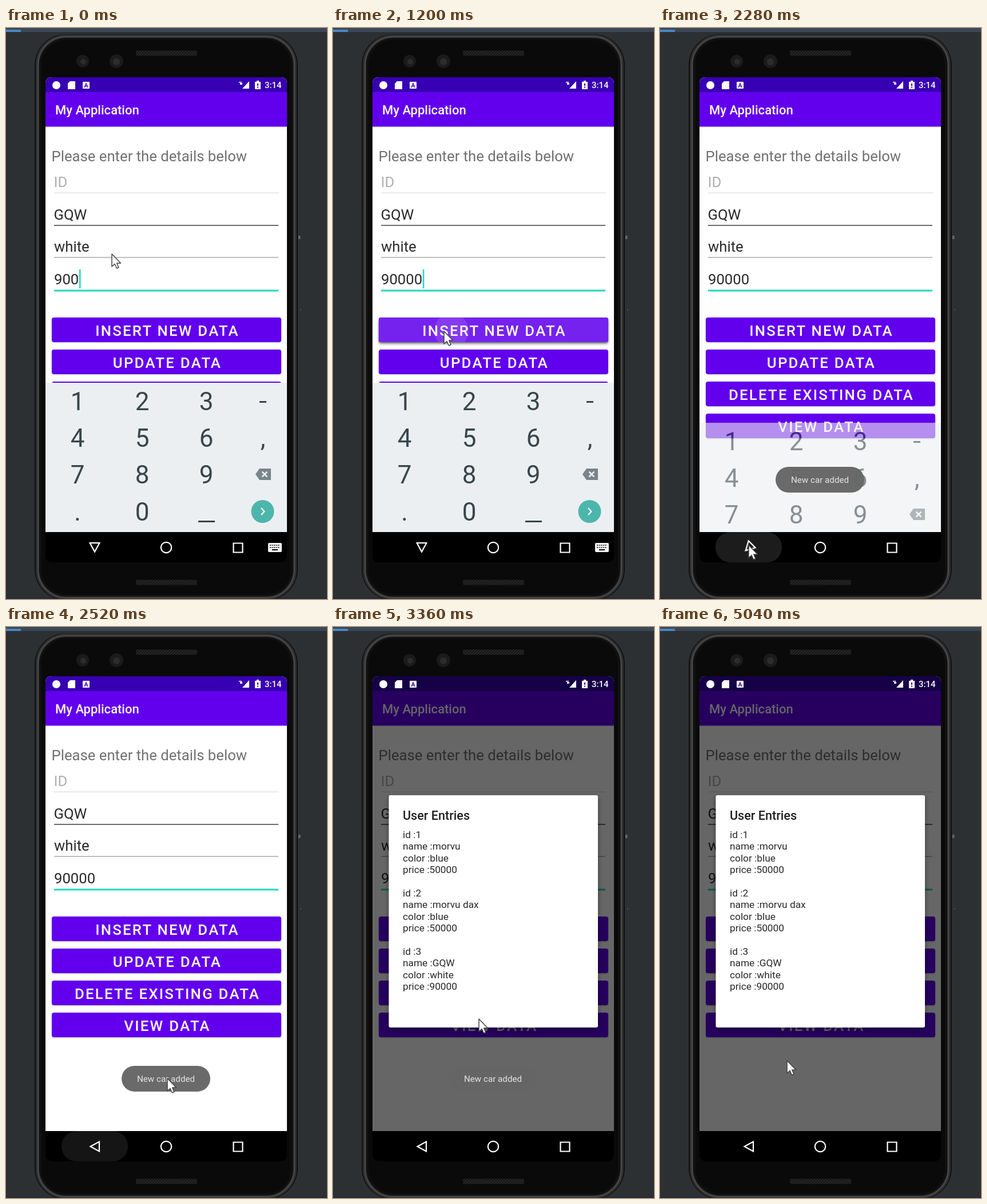
These frames come from a looping animation (561x998 px, 5520 ms). An HTML page:

```html
<!DOCTYPE html>
<html lang="en">
<head>
<meta charset="utf-8">
<title>Car form demo</title>
<style>
html, body { margin: 0; width: 100%; height: 100%; overflow: hidden; background: #2d3032; }
svg { display: block; width: 561px; height: 998px; font-family: Roboto, sans-serif; filter: blur(.75px); }

.form { font-size: 25.7px; fill: #2a2a2a; }
.btn { fill: #6200ee; filter: drop-shadow(0 1.5px 1px #0004); }
.pressed { fill: #7622ef; filter: drop-shadow(0 3px 2px #0007); }
.caps { font-size: 25.7px; font-weight: 500; letter-spacing: 2.29px; fill: #fff; text-anchor: middle; }
.keys { font-size: 44px; fill: #37464d; text-anchor: middle; }
.nav { fill: none; stroke: #fff; stroke-width: 2.2; }
.line { fill: none; stroke-linejoin: round; }

/* One loop is 46 ticks of 120 ms; every change lands on a tick. */
.a { animation: 5520ms step-end infinite; }
#pointer { animation-name: pointer; }
#fourth { animation-name: fourth; }
#fifth { animation-name: fifth; }
#caret { animation-name: caret; }
#tapInsert { animation-name: tapInsert; }
#tapView { animation-name: tapView; }
#waveInsert { animation-name: waveInsert; transform-origin: 207px 529px; }
#waveView { animation-name: waveView; transform-origin: 274px 697px; }
#keyboard { animation-name: keyboard; }
#imeIcon { animation-name: imeIcon; }
#back { animation-name: back; transform-origin: 155px 908px; }
#backWave { animation-name: backWave; }
#toast { animation-name: toast; }
#dim { animation-name: dim; }
#dialog { animation-name: dialog; }

@keyframes pointer {
  0% { transform: translate(185px, 395px); }
  13.04% { transform: translate(185px, 395px); animation-timing-function: steps(3); }
  19.56% { transform: translate(194px, 530px); }
  23.91% { transform: translate(194px, 530px); animation-timing-function: steps(3); }
  30.43% { transform: translate(236px, 900px); animation-timing-function: steps(2); }
  34.78% { transform: translate(155px, 904px); }
  41.3% { transform: translate(155px, 904px); animation-timing-function: steps(2); }
  45.65% { transform: translate(282px, 789px); animation-timing-function: steps(3); }
  52.17% { transform: translate(272px, 704px); }
  58.69% { transform: translate(272px, 704px); animation-timing-function: steps(3); }
  65.21% { transform: translate(221px, 647px); }
  69.56% { transform: translate(221px, 647px); animation-timing-function: steps(2); }
  73.91% { transform: translate(115px, 597px); }
  78.26% { transform: translate(115px, 597px); animation-timing-function: steps(6); }
  91.3%, 100% { transform: translate(222px, 758px); }
}
@keyframes fourth { 0% { fill-opacity: 0; } 6.52%, 100% { fill-opacity: 1; } }
@keyframes fifth { 0% { fill-opacity: 0; } 13.04%, 100% { fill-opacity: 1; } }
@keyframes caret {
  0% { transform: none; opacity: 1; }
  6.52% { transform: translateX(14.4px); opacity: 1; }
  13.04% { transform: translateX(28.8px); opacity: 1; }
  23.91% { transform: translateX(28.8px); opacity: 0; }
  32.6% { transform: translateX(28.8px); opacity: 1; }
  41.3% { transform: translateX(28.8px); opacity: 0; }
  50% { transform: translateX(28.8px); opacity: 1; }
  58.69%, 100% { transform: translateX(28.8px); opacity: 0; }
}
@keyframes tapInsert {
  0% { opacity: 0; } 19.56% { opacity: .5; } 21.73% { opacity: 1; }
  26.08% { opacity: .45; } 28.26%, 100% { opacity: 0; }
}
@keyframes waveInsert {
  0% { transform: scale(.4); } 21.73% { transform: none; }
  23.91% { transform: scale(3); } 26.08%, 100% { transform: scale(7); }
}
@keyframes tapView {
  0% { opacity: 0; } 54.34% { opacity: .5; } 56.52% { opacity: 1; }
  58.69% { opacity: .6; } 60.86%, 100% { opacity: 0; }
}
@keyframes waveView {
  0% { transform: scale(.4); } 56.52% { transform: none; } 58.69%, 100% { transform: scale(4); }
}
@keyframes keyboard {
  0% { transform: none; opacity: 1; }
  41.3% { transform: translateY(70px); opacity: .6; }
  43.47%, 100% { transform: translateY(262px); opacity: 0; }
}
@keyframes imeIcon { 0% { opacity: 1; } 41.3%, 100% { opacity: 0; } }
@keyframes back {
  0% { transform: rotate(-90deg); } 41.3% { transform: rotate(-45deg); } 43.47%, 100% { transform: none; }
}
@keyframes backWave {
  0% { opacity: 0; } 39.13% { opacity: .6; } 41.3% { opacity: 1; }
  45.65% { opacity: .75; } 47.82% { opacity: .35; } 50%, 100% { opacity: 0; }
}
@keyframes toast {
  0% { opacity: 0; } 28.26% { opacity: .35; } 30.43% { opacity: .9; } 32.6% { opacity: 1; }
  65.21% { opacity: .5; } 67.39%, 100% { opacity: 0; }
}
@keyframes dim { 0% { opacity: 0; } 58.69% { opacity: .35; } 60.86%, 100% { opacity: .6; } }
@keyframes dialog {
  0% { opacity: 0; } 56.52% { opacity: .24; } 58.69% { opacity: .75; } 60.86%, 100% { opacity: 1; }
}
</style>
</head>
<body>
<svg viewBox="0 0 561 998">
  <defs>
    <clipPath id="screen"><path d="M69 934V97Q69 86 80 86H480Q491 86 491 97V934Z"/></clipPath>
    <clipPath id="imeArea"><path d="M69 620H491V881H69Z"/></clipPath>
    <clipPath id="insertArea"><rect x="80" y="506" width="401" height="43" rx="4"/></clipPath>
    <clipPath id="viewArea"><rect x="80" y="674" width="401" height="43" rx="4"/></clipPath>
    <pattern id="mesh" width="5" height="5" patternUnits="userSpaceOnUse">
      <path d="M0 0H5V5H0Z" fill="#181818"/><path d="M0 5L5 0" stroke="#383838"/>
    </pattern>
  </defs>

  <!-- backdrop and phone body -->
  <path d="M-5 -5H566V1003H-5Z" fill="#2d3032"/>
  <path d="M-5 -5H566V7H-5Z" fill="#3c4855"/>
  <path d="M-5 3H26V7H-5Z" fill="#4a87c5"/>
  <path d="M-5 996H566V1003H-5Z" fill="#25273a"/>
  <rect x="50" y="11" width="460" height="989" rx="54" fill="#101010"/>
  <rect x="55" y="14.500" width="450" height="982" rx="50" class="line" stroke="#2f2f2f" stroke-width="6"/>
  <rect x="56" y="15" width="448" height="981" rx="49" class="line" stroke="#4a4a4a" stroke-width="2"/>
  <rect x="62" y="21" width="436" height="969" rx="43" fill="#0a0a0a"/>
  <path d="M511 363H514.500V369H511Z" fill="#666"/>
  <path d="M514 491H516V494H514Z" fill="#484848"/>
  <g fill="#1b1b1b"><circle cx="134" cy="58" r="11"/><circle cx="193" cy="58" r="12"/></g>
  <g fill="#2c2c2e"><circle cx="135" cy="59" r="5"/><circle cx="193" cy="59" r="6"/></g>
  <g fill="url(#mesh)">
    <rect x="227" y="39.500" width="107" height="9" rx="3"/>
    <rect x="227" y="964.500" width="107" height="9" rx="3"/>
  </g>

  <g clip-path="url(#screen)">
    <path d="M69 86H491V881H69Z" fill="#fff"/>
    <path d="M69 86H491V112H69Z" fill="#3700b3"/>
    <path d="M69 112H491V172.500H69Z" fill="#6200ee"/>
    <text x="86" y="151" font-size="22" font-weight="500" fill="#fff">My Application</text>

    <!-- form -->
    <text x="79.500" y="233" font-size="25.7" fill="#717171">Please enter the details below</text>
    <g class="form">
      <text x="83.500" y="278" fill="#b0b0b0">ID</text>
      <text x="83.500" y="335">GQW</text>
      <text x="84" y="391">white</text>
      <text x="84" y="448">900<tspan id="fourth" class="a">0</tspan><tspan id="fifth" class="a">0</tspan></text>
    </g>
    <path d="M84 287.500H477V289H84Z" fill="#e2e2e2"/>
    <path d="M84 344H476V346H84Z" fill="#6c6c6c"/>
    <path d="M84 400H476V402H84Z" fill="#bdbdbd"/>
    <path d="M84 457.500H476V460.500H84Z" fill="#1fd8c4"/>
    <path id="caret" class="a" d="M128 422H130.500V455H128Z" fill="#1fd8c4"/>

    <!-- buttons -->
    <rect class="btn" x="80" y="506" width="401" height="43" rx="4"/>
    <rect class="btn" x="80" y="562" width="401" height="43" rx="4"/>
    <rect class="btn" x="80" y="618" width="401" height="43" rx="4"/>
    <rect class="btn" x="80" y="674" width="401" height="43" rx="4"/>
    <g id="tapInsert" class="a">
      <rect class="pressed" x="80" y="506" width="401" height="43" rx="4"/>
      <g clip-path="url(#insertArea)"><circle id="waveInsert" class="a" cx="207" cy="529" r="30" fill="#fff" fill-opacity=".11"/></g>
    </g>
    <g id="tapView" class="a">
      <rect class="pressed" x="80" y="674" width="401" height="43" rx="4"/>
      <g clip-path="url(#viewArea)"><circle id="waveView" class="a" cx="274" cy="697" r="41" fill="#fff" fill-opacity=".11"/></g>
    </g>
    <g class="caps">
      <text x="282" y="537.500">INSERT NEW DATA</text>
      <text x="282" y="593.500">UPDATE DATA</text>
      <text x="282" y="649.500">DELETE EXISTING DATA</text>
      <text x="282" y="705.500">VIEW DATA</text>
    </g>

    <!-- numeric keyboard -->
    <g clip-path="url(#imeArea)">
      <g id="keyboard" class="a">
        <path d="M69 620H491V881H69Z" fill="#eceff1"/>
        <g class="keys">
          <text x="125 238 350" y="668">123</text>
          <text x="125 238 350" y="732">456</text>
          <text x="125 238 350" y="796">789</text>
          <text x="125 238" y="861">.0</text>
          <text x="449" y="732">,</text>
        </g>
        <path d="M336 861H365V864H336ZM443 652H455V655H443Z" fill="#37464d"/>
        <path d="M436 780L443 770H463V790H443Z" fill="#79858b"/>
        <path d="M447.500 775.500L456.500 784.500M456.500 775.500L447.500 784.500" stroke="#eceff1" stroke-width="2.500"/>
        <circle cx="448.500" cy="845" r="20" fill="#4db6ac"/>
        <path class="line" d="M446 839L451.500 845L446 851" stroke="#fff" stroke-width="2.200"/>
      </g>
    </g>

    <!-- dialog -->
    <path id="dim" class="a" d="M69 86H491V881H69Z" opacity="0"/>
    <g id="dialog" class="a">
      <rect x="97.500" y="294" width="365.500" height="406" rx="3" fill="#fff" style="filter: drop-shadow(0 3px 5px #0006)"/>
      <text x="122" y="337" font-size="21.6" font-weight="500" fill="#202020">User Entries</text>
      <text y="369" font-size="17.3" fill="#282828">
        <tspan x="122">id :1</tspan>
        <tspan x="122" dy="20.4">name :morvu</tspan>
        <tspan x="122" dy="20.4">color :blue</tspan>
        <tspan x="122" dy="20.4">price :50000</tspan>
        <tspan x="122" dy="40.8">id :2</tspan>
        <tspan x="122" dy="20.4">name :morvu dax</tspan>
        <tspan x="122" dy="20.4">color :blue</tspan>
        <tspan x="122" dy="20.4">price :50000</tspan>
        <tspan x="122" dy="40.8">id :3</tspan>
        <tspan x="122" dy="20.4">name :GQW</tspan>
        <tspan x="122" dy="20.4">color :white</tspan>
        <tspan x="122" dy="20.4">price :90000</tspan>
      </text>
    </g>

    <!-- status icons -->
    <g fill="#fff">
      <circle cx="88" cy="100" r="7"/>
      <path d="M112 93H121V107H108V97Z"/>
      <rect x="134" y="94" width="12" height="12" rx="1"/>
      <path d="M425 93V106H413ZM407 94H412V95.500H407ZM409 96H413V99H409Z"/>
      <path d="M438 92H442V94H445V107H435V94H438Z"/>
      <text x="452" y="105" font-size="15" font-weight="500">3:14</text>
    </g>
    <path class="line" d="M137 104L140 96.500L143 104M138 101.500H142" stroke="#3700b3" stroke-width="1.300"/>
    <path d="M439 97H441V101H439ZM439 102.500H441V104.500H439Z" fill="#3700b3"/>
  </g>

  <!-- navigation bar -->
  <path d="M69 881H491V921Q491 934 478 934H82Q69 934 69 921Z"/>
  <rect id="backWave" class="a" x="97" y="881" width="116" height="53" rx="26" fill="#1c1c1c"/>
  <g class="nav">
    <path id="back" class="a" d="M147.500 908L163 899.500V916.500Z"/>
    <circle cx="280" cy="908" r="9.200"/>
    <path d="M397.500 900.500H413.500V916.500H397.500Z"/>
  </g>
  <g id="imeIcon" class="a">
    <rect x="458" y="900" width="24" height="16" rx="2" fill="#f2f2f2"/>
    <path d="M461 904H479M461 908H479" stroke="#000" stroke-width="1.500" stroke-dasharray="2 1.500"/>
    <path d="M465 911H475V913H465Z"/>
  </g>

  <g id="toast" class="a">
    <rect x="202" y="767" width="155" height="45" rx="22.500" fill="#666" fill-opacity=".97"/>
    <text x="279.500" y="795" font-size="15.2" fill="#e4e4e4" text-anchor="middle">New car added</text>
  </g>

  <path id="pointer" class="a line" d="M0 0V22L5 17.500L8.500 25L12 23.500L8.700 16H15.500Z" style="fill: #fff" stroke="#444" stroke-width="1.500"/>
</svg>
</body>
</html>
```
